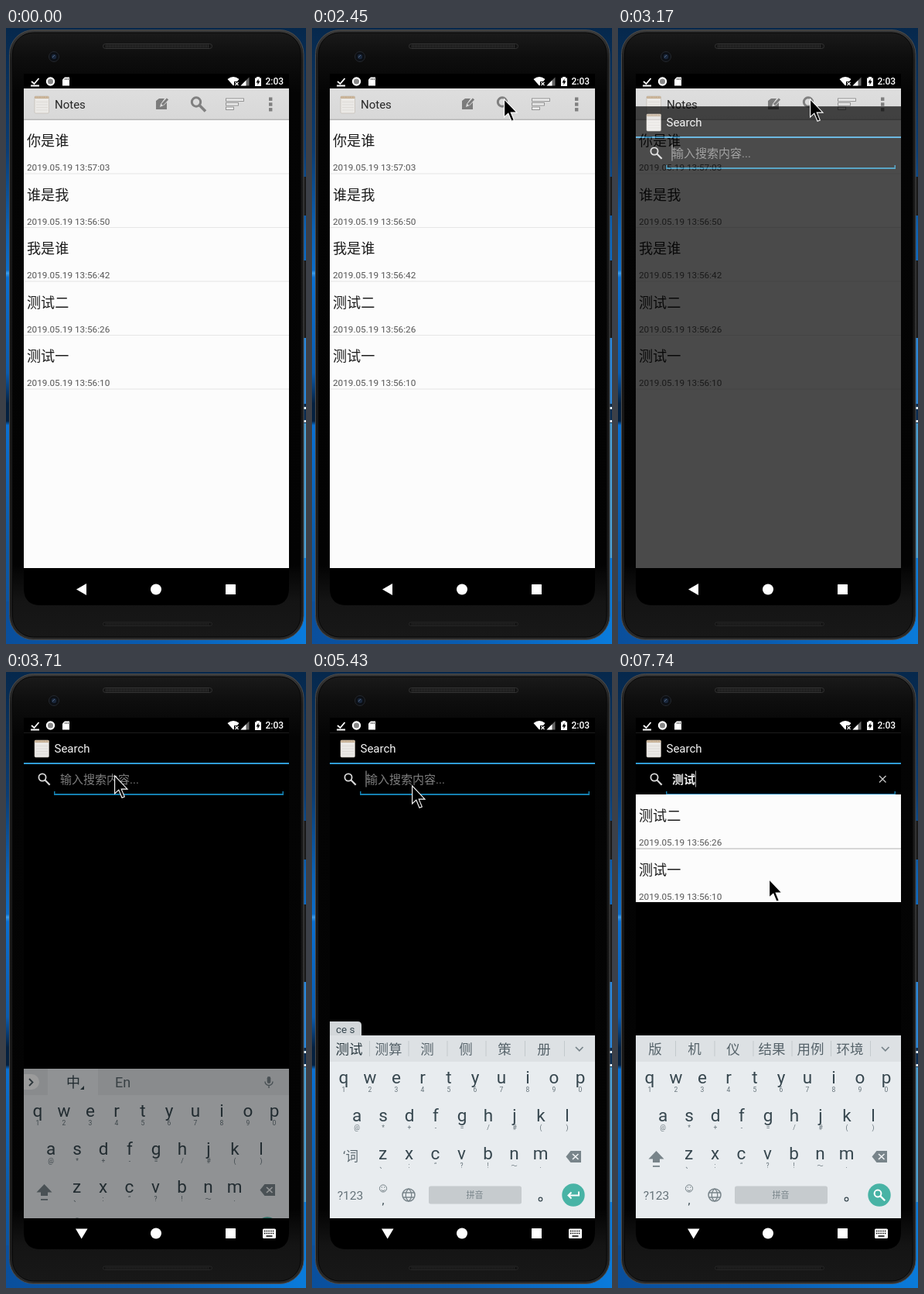
These frames come from a looping animation (388 px wide and 795 px high, 8000 ms). An HTML page:

```html
<!DOCTYPE html>
<html lang="zh-CN">
<head>
<meta charset="utf-8">
<title>Notes search</title>
<style>
html, body { margin: 0; width: 100%; height: 100%; overflow: hidden; background: #0a4f9a; }
svg { display: block; width: 388px; height: 795px; }
text { font-family: Roboto, "Noto Sans CJK SC", "Noto Sans CJK", sans-serif; white-space: pre; }
.mid { text-anchor: middle; }
</style>
</head>
<body>
<svg id="stage" viewBox="0 0 388 795" xmlns="http://www.w3.org/2000/svg"></svg>
<script>
const LOOP = 8000;

// Drawing helpers, all returning SVG markup
const rect = (x, y, w, h, fill, more = "") =>
  `<rect x="${x}" y="${y}" width="${w}" height="${h}" fill="${fill}" ${more}/>`;
const circle = (x, y, r, fill, more = "") => `<circle cx="${x}" cy="${y}" r="${r}" fill="${fill}" ${more}/>`;
const path = (d, fill, more = "") => `<path d="${d}" fill="${fill}" ${more}/>`;
const line = (d, color, width = 1, more = "") =>
  `<path d="${d}" fill="none" stroke="${color}" stroke-width="${width}" ${more}/>`;
const text = (x, y, size, fill, s, more = "") =>
  `<text x="${x}" y="${y}" font-size="${size}" fill="${fill}" ${more}>${s}</text>`;
const center = (x, y, size, fill, s, more = "") => text(x, y, size, fill, s, `class="mid" ${more}`);
const group = (id, body, more = "") => `<g id="${id}" ${more}>${body}</g>`;
const gradient = (id, stops, across) => `<linearGradient id="${id}" x1="0" y1="0" x2="${across ? 1 : 0}" y2="${across ? 0 : 1}">` +
  stops.map(([at, color]) => `<stop offset="${at}" stop-color="${color}"/>`).join("") + "</linearGradient>";

const SCREEN = "M23 59H366V723Q366 745 344 745H45Q23 745 23 723Z";

const defs = `<defs>
  ${gradient("desk", [[0, "#06284c"], [.2, "#0a3d74"], [.33, "#0b62b6"], [.393, "#0b6cc8"], [.398, "#3a9cec"],
    [.405, "#0a6fd0"], [.56, "#0a5cb0"], [.61, "#04203f"], [.638, "#04203f"], [.645, "#0a70d2"],
    [.85, "#0a5aa8"], [1, "#0a4f9c"]])}
  ${gradient("floor", [[0, "#0a4f9c"], [.5, "#0a5cb0"], [1, "#0a7bdb"]], true)}
  ${gradient("rim", [[0, "#3a3a3a"], [.05, "#1c1c1c"], [.5, "#161616"], [.95, "#1c1c1c"], [1, "#2a2a2a"]])}
  ${gradient("glass", [[0, "#1a1a1a"], [.04, "#0e0e0e"], [.1, "#040404"], [.88, "#030303"], [.94, "#141414"], [1, "#181818"]])}
  ${gradient("bar", [[0, "#dedede"], [1, "#d8d8d8"]])}
  <clipPath id="screenClip"><path d="${SCREEN}"/></clipPath>
  <clipPath id="pageClip"><rect x="23" y="78" width="343" height="619"/></clipPath>
  <clipPath id="keyClip"><rect x="23" y="440" width="343" height="265"/></clipPath>
</defs>`;

const speaker = (y, h, edge) => rect(125.5, y, 141, h, "#141414", `rx="${h / 2}" stroke="${edge}"`) +
  line(`M129 ${y + h / 2}H263`, edge, h - 2, 'stroke-dasharray="1 1"');

const phone = rect(0, 0, 388, 795, "url(#desk)") + rect(0, 740, 388, 55, "url(#floor)") +
  rect(385, 400, 3, 85, "#2a86d8") + rect(385, 485, 3, 25, "#0a2c50") +
  rect(385, 489, 3, 3, "#dfeefa") + rect(385, 506, 3, 3, "#dfeefa") +
  rect(385, 510, 3, 174, "#4a9fd2") + rect(385, 684, 3, 80, "#0a7bdb") +
  rect(385, 192, 3, 50, "#1a1a1a") + rect(385, 300, 3, 100, "#1a1a1a") +
  rect(4.5, 2.5, 380.5, 787, "url(#rim)", 'rx="31" stroke="#4c4c4c"') +
  rect(8.5, 6, 372.5, 780, "url(#glass)", 'rx="27" stroke="#070707"') +
  speaker(20.5, 6, "#333") + speaker(767, 4.5, "#262626") +
  circle(62, 37, 6.5, "#0c0f14", 'stroke="#25282d"') + circle(62, 37, 3.2, "#1a273c") +
  line("M60 38L63 35", "#56687f") +
  path(SCREEN, "#000");

const statusBar = line("M33 69L36.500 72L42.500 65M32 74.500H43", "#fff", 1.8) +
  circle(57.5, 69, 4.6, "#888", 'stroke="#fff" stroke-width="2.200"') +
  path("M76 63.500H82V74.500H73V66.500Z", "#fff") + line("M76.500 65V67M78.500 65V67M80.500 65V67", "#555") +
  path("M286.500 66Q294 60 301.500 66L299 69H295V73.500L294 74.500Z", "#fff") +
  line("M296.500 70L300.500 74M300.500 70L296.500 74", "#fff", 1.2) +
  path("M314.500 63.500V74.500H303.500Z", "#666") + path("M310.500 67.500V74.500H303.500Z", "#fff") +
  path("M322 64.500H324V63H328V64.500H330V75H322Z", "#fff") + path("M326.500 65.500L323.500 70.500H325.500V73.500L328.500 68.500H326.500Z", "#000") +
  text(335.5, 73, 12, "#fff", "2:03", 'font-weight="500"');

const notepad = rect(37, 88, 18.5, 22, "#ebe9e6", 'rx="1.500" stroke="#bcb6ac" stroke-width=".6"') +
  rect(37, 88, 18.5, 3, "#c2a98a", 'rx="1.200"') + line("M38.500 89.300H55", "#ddd4c8", 1.4, 'stroke-dasharray="1 1.500"') +
  line("M39 95.500H54M39 99H54M39 102.500H54M39 106H54", "#d8d6d2", .7);

const lens = (x, y, r, color, width) => circle(x, y, r, "none", `stroke="${color}" stroke-width="${width}"`) +
  line(`M${x + r * .75} ${y + r * .75}L${x + r * 2.1} ${y + r * 2.1}`, color, width * 1.2);

const row = (top, title, date) => text(27, top + 33.5, 18.1, "#1c1c1c", title) +
  text(27, top + 65.5, 11.75, "#555", "2019.05.19 " + date);

const notes = [["你是谁", "13:57:03"], ["谁是我", "13:56:50"], ["我是谁", "13:56:42"], ["测试二", "13:56:26"], ["测试一", "13:56:10"]];
const page = rect(23, 78, 343, 619, "#fcfcfc") + rect(23, 78, 343, 40, "url(#bar)") +
  rect(23, 117.5, 343, 1.5, "#b8b8b8") + notepad + text(63, 104, 15, "#262626", "Notes") +
  path("M194 94L198 91H205L200 98L199 102L204 100L208 96V105H194Z", "#7c7c7c") +
  line("M202 99L209 91.500", "#7c7c7c", 3) +
  lens(246, 95.5, 5.7, "#808080", 3) +
  [[91, 23], [96.5, 16], [102, 10]].map(([y, w]) => rect(284.5, y, w, 3.5, "#eee", 'stroke="#8c8c8c" stroke-width=".900"')).join("") +
  [89.5, 96.3, 103.1].map(y => rect(340, y, 4.4, 4.4, "#808080")).join("") +
  notes.map(([a, b], i) => row(118.5 + 69.5 * i, a, b) + rect(23, 187.5 + 69.5 * i, 343, 1, "#e6e6e6")).join("");

const search = rect(23, 78, 343, 627, "#000") + rect(23, 78, 343, 1, "#1c1c1c") + notepad +
  text(62.5, 104, 15, "#f5f5f5", "Search") + rect(23, 117, 343, 2, "#309cd6") +
  lens(47, 136, 4.6, "#d8d8d8", 1.8) +
  rect(62, 157, 297, 2, "#1580b0") + rect(62, 154, 1.5, 3, "#1580b0") + rect(357.5, 154, 1.5, 3, "#1580b0") +
  group("hint", text(70, 144, 15, "#7d7d7d", "输入搜索内容...")) +
  group("result", text(70, 144, 15, "#eee", "测试", 'font-weight="700"') +
    line("M338 134L346.500 142.500M346.500 134L338 142.500", "#c4c4c4", 1.4) +
    rect(23, 158, 343, 139, "#fcfcfc") + row(158.5, ...notes[3]) + row(228, ...notes[4]) + rect(23, 227.5, 343, 1, "#b4b4b4")) +
  rect(69.5, 127.5, 1, 21, "#aaa", 'id="caret"');

// Keyboard
const INK = "#37474f", GREY = "#78848a";
const keyRow = (x0, y, keys, marks, markY) => [...keys].map((k, i) => center(x0 + 34 * i, y, 22.5, INK, k) +
  center(x0 + 34 * i, markY, 8.5, "#66737a", marks[i])).join("");

const keyboard = rect(23, 469, 343, 236, "#e8ecef") + rect(23, 469, 343, 34, "#dde1e4") +
  group("tools", rect(54, 469, 65, 34, "#e8ecef") + path("M23 476H33A10 10 0 0 1 33 496H23Z", "#fafbfb") +
    line("M30 482L34.500 486.500L30 491", "#4c5a61", 1.8) +
    center(87, 493, 18, INK, "中") + path("M101 491V496H96Z", INK) + center(151, 493, 18, "#5b686f", "En") +
    rect(337.7, 479, 4.6, 9, GREY, 'rx="2.300"') + line("M335 485.500A5 5 0 0 0 345 485.500M340 490.500V494", GREY, 1.4)) +
  group("words", [74, 124.5, 174.5, 224.5, 275, 326].map(x => rect(x, 476, 1, 20, "#c3c9cc")).join("") +
    [48, 99, 149, 199, 249, 300].map(x => center(x, 492.500, 17.5, "#56636a", "")).join("") +
    line("M341 484L345.800 488.800L350.500 484", GREY, 1.7)) +
  keyRow(41, 531, "qwertyuiop", "1234567890", 542) +
  keyRow(58, 579.5, "asdfghjkl", "@*+-=/#()", 591) +
  keyRow(91.5, 629, "zxcvbnm", "、:“?!～.", 640) +
  group("shift", path("M49.500 618L59.500 628.500H54V633H45V628.500H39.500Z", GREY) + rect(45, 637, 9, 1.8, GREY)) +
  group("split", center(50, 631, 16.5, "#5b686f", "‘词")) +
  path("M328.500 625.500L334.500 618H348V633H334.500Z", GREY) + line("M337 622L344.500 629M344.500 622L337 629", "#eef1f3", 1.7) +
  center(49.5, 681, 15.5, "#66737a", "?123") +
  circle(92, 666.5, 4.6, "none", `stroke="${GREY}"`) + line("M89.500 668A2.800 2.800 0 0 0 94.500 668", GREY) +
  circle(90.3, 665, .7, GREY) + circle(93.7, 665, .7, GREY) + center(92, 687, 15, INK, ",") +
  circle(125, 675, 8, "none", `stroke="${GREY}" stroke-width="1.500"`) +
  line("M118 672H132M118 678H132M125 667C120 671 120 679 125 683C130 679 130 671 125 667", GREY, 1.3) +
  rect(151, 663.5, 120, 23, "#c6cbce", 'rx="2.500"') + center(210.5, 679, 11, GREY, "拼音") +
  circle(295.5, 680.5, 2.3, "none", `stroke="${INK}" stroke-width="1.200"`) +
  circle(338, 675, 14.7, "#48b3a5") + group("find", lens(336, 673, 4.4, "#fff", 2)) +
  group("enter", line("M345 670.500V675.500H332M335.500 671.500L331.500 675.500L335.500 679.500", "#fff", 2)) +
  group("compose", path("", "#d3d7da", 'id="tab"') + text(31, 465.5, 13.4, "#37474f", "", 'id="typed"'));

const nav = group("navBack", path("M104 717V732L91 724.500Z", "#fff")) +
  group("navDown", path("M90 718.500H105.500L97.700 731.500Z", "#fff") +
    rect(332, 718.5, 17, 12.5, "#fff", 'rx="1.500"') +
    line("M334 721.500H347M334 724.500H347", "#000", 1.4, 'stroke-dasharray="1.500 1.200"') + line("M336.500 728H344.500", "#000", 1.4)) +
  circle(194, 724.5, 7, "#fff") + rect(284, 718, 13, 13, "#fff", 'rx=".500"');

document.getElementById("stage").innerHTML = defs + phone + statusBar +
  `<g clip-path="url(#screenClip)"><g clip-path="url(#pageClip)">${page}</g>
   <g id="searchClip" clip-path="url(#pageClip)">${group("search", search)}</g>
   <g clip-path="url(#keyClip)">${group("keyboard", keyboard)}</g>${nav}</g>` +
  circle(248, 91, 15, "#ffff00", 'id="click" opacity=".470"') +
  path("M.600 .800V24L5.800 19.200L10 29.300L13.300 27.900L9.200 18.100H17Z", "#000",
    'id="pointer" stroke="#fff" stroke-width="1.100"');

const el = {};
document.querySelectorAll("#stage [id]").forEach(n => el[n.id] = n);
const slots = [...el.words.querySelectorAll("text")];

// Each track is a table of [time, ...values]; a value holds until the next step
const at = (track, t) => track.reduce((last, step) => step[0] <= t ? step : last).slice(1);

// Pointer enters from below along a curve and slows towards the toolbar
const entry = Array.from({ length: 11 }, (_, i) => {
  const k = 1 - (1 - i / 10) ** 1.6, bend = (a, b, c) => (1 - k) ** 2 * a + 2 * k * (1 - k) * b + k * k * c;
  return [540 + 76 * i, bend(294, 200, 238), bend(775, 430, 169)];
});
const pointer = [[0, 0, 900], ...entry,
  [1380, 240, 155], [1460, 244, 126], [1530, 247, 103], [1610, 248, 91],
  [3400, 242, 93], [3480, 216, 103], [3560, 184, 116], [3630, 156, 127], [3710, 140, 133], [3790, 135, 142], [3860, 133, 147],
  [4180, 129, 146], [6040, 150, 184], [6120, 180, 232], [6200, 195, 260], [6430, 195, 267]];
const sheet = [[0, 0, 0], [3000, 46, .35], [3170, 23, .7], [3240, 9, .9], [3400, 0, 1]];
const rise = [[0, 236, 0], [3560, 150, .15], [3630, 88, .37], [3710, 43, .62], [3790, 14, .86], [3860, 0, 1]];
const caret = [[0, 1], [3480, 0], [4010, 1], [4560, 0], [5110, 1], [5660, 0], [6120, 1], [6580, 0], [6730, 1], [7210, 0], [7740, 1]];
const typed = [[0, ""], [4960, "c", 46], [5040, "ce", 53], [5260, "ce s", 64], [5580, "ce shi", 74], [6730, ""]];
const words = [[0, ""], [4960, "才 从 次 出 长 此"], [5110, "策 测 侧 册 厕 恻"], [5430, "测试 测算 测 侧 策 册"],
  [5660, "测试 测 侧 册 策 厕"], [6730, "版 机 仪 结果 用例 环境"]];

const show = (node, on) => node.setAttribute("visibility", on ? "visible" : "hidden");
const place = (node, x, y) => node.setAttribute("transform", `translate(${x} ${y})`);

function draw(t) {
  const [px, py] = at(pointer, t), [drop, shade] = at(sheet, t), [down, glow] = at(rise, t);
  const [letters, edge] = at(typed, t), [list] = at(words, t);
  const done = t >= 6730;

  place(el.pointer, px, py);
  show(el.click, t >= 2390 && t < 2450);
  place(el.search, 0, drop);
  el.searchClip.setAttribute("opacity", shade);
  place(el.keyboard, 0, down);
  el.keyboard.setAttribute("opacity", glow);

  show(el.navBack, t < 3240);
  show(el.navDown, t >= 3240);
  show(el.hint, !done);
  show(el.result, done);
  show(el.caret, at(caret, t)[0]);
  el.caret.setAttribute("x", done ? 100 : 69.5);

  show(el.tools, !list);
  show(el.words, list);
  list.split(" ").forEach((w, i) => slots[i].textContent = w);
  slots[0].setAttribute("font-weight", letters ? 500 : 400);
  slots[0].setAttribute("fill", letters ? "#2b3a41" : "#56636a");
  show(el.compose, letters);
  show(el.split, letters);
  show(el.shift, !letters);
  show(el.enter, letters);
  show(el.find, !letters);
  el.typed.textContent = letters;
  if (letters) el.tab.setAttribute("d", `M23 451H${edge - 5}Q${edge} 451 ${edge} 456V469H23Z`);
}

const start = performance.now();
function tick() {
  draw((performance.now() - start) % LOOP);
  requestAnimationFrame(tick);
}
tick();
</script>
</body>
</html>
```
